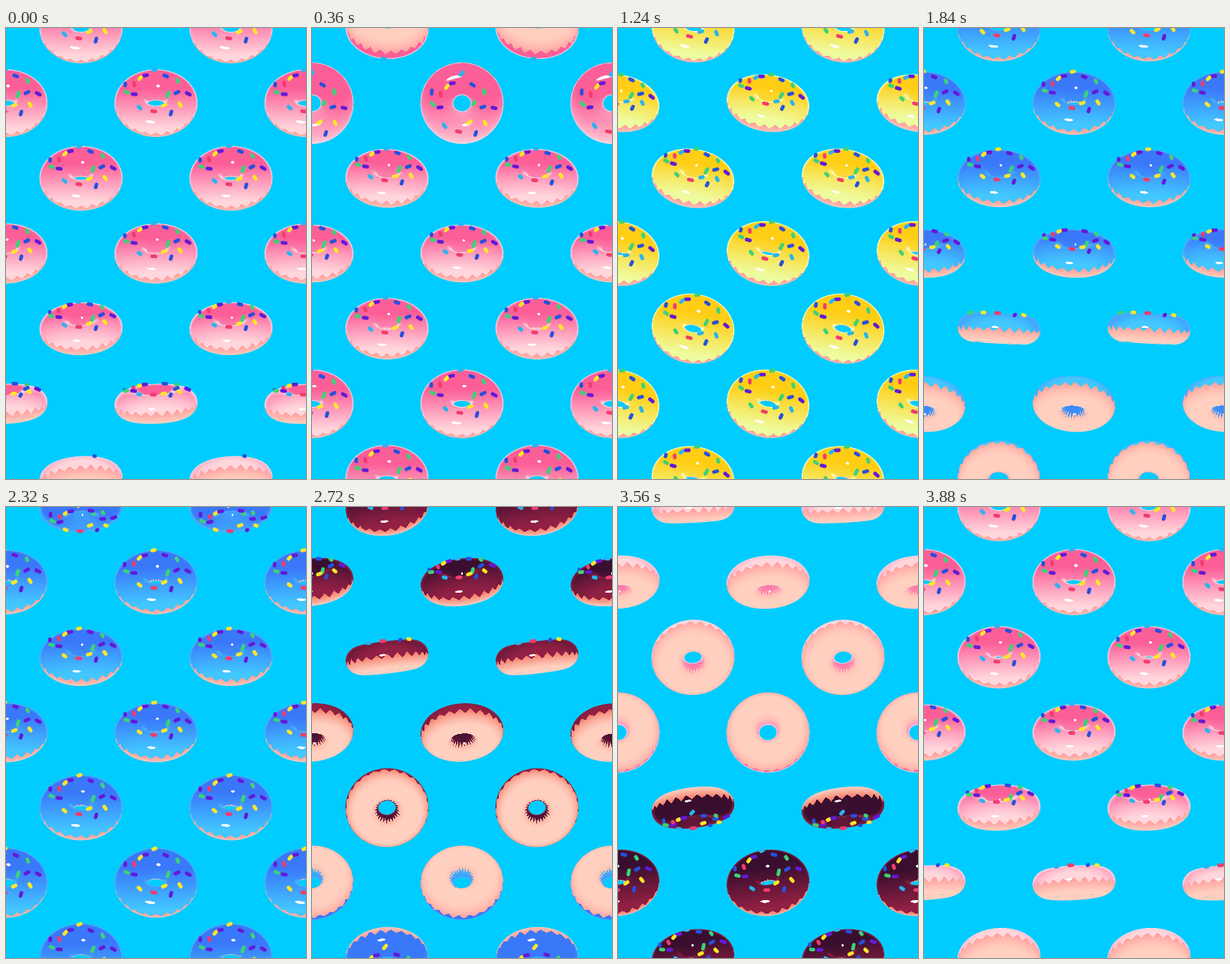
An HTML page with a canvas for the animation above (3920 ms loop, 400 by 600 pixels).

```html
<!DOCTYPE html>
<html>
<head>
<meta charset="utf-8">
<title>Flipping donuts</title>
<style>
html, body { margin: 0; width: 100%; height: 100%; overflow: hidden; background: #00ccff; }
canvas { display: block; }
</style>
</head>
<body>
<canvas id="stage" width="400" height="600"></canvas>
<script>
const LOOP = 3920, TURN = LOOP / 4, STEP = 40, ROW_DELAY = 68;
const RING = 33.5, TUBE = 21.5, FLAT = 19 / TUBE, SIZE = 120, HALF = SIZE / 2, TEETH = 24;

const stage = document.getElementById('stage').getContext('2d');
const sprite = document.createElement('canvas');
sprite.width = sprite.height = SIZE;
const pen = sprite.getContext('2d', { willReadFrequently: true });
const image = pen.createImageData(SIZE, SIZE);
const depth = new Float32Array(SIZE * SIZE);

const RED = '#f03c6e', YELLOW = '#ffe628', GREEN = '#3cd278',
      CYAN = '#28b4f0', BLUE = '#2850dc', PURPLE = '#6419d7';

// Icing goes from deep at the back to pale at the front; swap recolours sprinkles.
const DONUTS = [
  { deep: [252, 94, 152], pale: [255, 214, 220], rim: [255, 214, 226], crust: [255, 156, 156], swap: {} },
  { deep: [255, 206, 20], pale: [238, 252, 160], rim: [255, 253, 200], crust: [255, 156, 152], swap: { [YELLOW]: CYAN, [CYAN]: GREEN } },
  { deep: [58, 120, 250], pale: [66, 200, 255], rim: [80, 175, 255], crust: [255, 160, 154], swap: { [CYAN]: YELLOW, [BLUE]: PURPLE } },
  { deep: [58, 14, 46], pale: [146, 32, 68], rim: [140, 30, 66], crust: [244, 122, 104], swap: {} }
];
const CRUMB = [255, 208, 192], WHITE = [255, 255, 255];

// x, z on the top face, colour
const SPRINKLES = [
  [-22, 27, CYAN], [-3, 34, RED], [11, 21, YELLOW], [20, 36, BLUE],
  [32, 21, YELLOW], [43, 0, PURPLE], [28, -1, BLUE], [16, -4, GREEN],
  [29, -22, GREEN], [13, -31, BLUE], [-14, -32, PURPLE], [-21, -27, YELLOW],
  [-29, -16, RED], [-39, -2, GREEN], [-29, 2, PURPLE], [-2, -45, CYAN], [-41, -18, BLUE]
];

// One flip: rows elapsed, tilt in degrees
const FLIP = [
  [0, -40.5], [.4, -39], [1.2, -49], [2.2, -56], [3.2, -58], [3.8, -55], [4.15, -45],
  [4.4, -20], [4.9, 50], [5.36, 107], [5.9, 147], [6.36, 177], [6.9, 202], [7.4, 222],
  [8, 239], [8.4, 251], [9, 269], [9.4, 282], [10, 292], [10.4, 297], [11, 303],
  [12, 310], [13, 315], [14.41, 319.5]
];
const LEAD = [24, 24, -18, 0];
const ROLLS = [0, 10, 0, -10];

const clamp = v => Math.max(0, Math.min(1, v));
const smooth = v => v * v * (3 - 2 * v);
const mix = (a, b, k) => a.map((v, i) => v + (b[i] - v) * k);
const light = [-.1, .07, 1].map(v => v / Math.hypot(.1, .07, 1));

function tiltAt(s) {
  const i = FLIP.findIndex(p => p[0] >= s);
  if (i === 0) return FLIP[0][1];
  if (i < 0) return FLIP[FLIP.length - 1][1];
  const [s0, a0] = FLIP[i - 1], [s1, a1] = FLIP[i];
  return a0 + (a1 - a0) * (s - s0) / (s1 - s0);
}

function poseAt(time) {
  const u = ((time % LOOP) + LOOP) % LOOP;
  const turn = Math.floor(u / TURN), next = (turn + 1) % 4;
  const elapsed = u - turn * TURN + LEAD[turn];
  const tilt = tiltAt(elapsed / ROW_DELAY);
  const roll = ROLLS[turn] + (ROLLS[next] - ROLLS[turn]) * smooth(clamp(elapsed / TURN));
  return {
    tilt: tilt * Math.PI / 180,
    roll: roll * Math.PI / 180,
    donut: DONUTS[tilt > 160 ? next : turn]
  };
}

function icingEdge(x, z) {
  const a = (Math.atan2(x, z) / (2 * Math.PI) + .5) * TEETH;
  const saw = Math.abs((a % 1) * 2 - 1) * 2 - 1;
  const base = Math.hypot(x, z) < RING ? -9 : -2;
  return base + saw * (3.2 + .7 * Math.sin(a * 1.05));
}

function shade(donut, x, y, z, sin, cos) {
  const rho = Math.hypot(x, z) || 1e-6, out = rho - RING, rise = y / FLAT ** 2;
  const len = Math.hypot(out, rise) || 1;
  const nx = out * x / rho / len, ny = rise / len, nz = out * z / rho / len;
  if (y < icingEdge(x, z)) return mix(donut.crust, CRUMB, clamp(-ny * 1.1));
  const up = -ny * sin - nz * cos, toward = ny * cos - nz * sin;
  const color = mix(donut.deep, donut.pale, clamp((z - y + 28) / 74));
  const rim = mix(color, donut.rim, clamp((.38 - toward) / .25));
  const gloss = nx * light[0] + up * light[1] + toward * light[2];
  return mix(rim, WHITE, clamp((gloss - .9955) / .0015));
}

function drawBody({ tilt, roll, donut }) {
  const sin = Math.sin(tilt), cos = Math.cos(tilt);
  const cr = Math.cos(roll), sr = Math.sin(roll);
  const reach = RING * Math.abs(cos) + TUBE + 1.5;
  const data = image.data;
  data.fill(0);
  depth.fill(-999);
  for (let py = 0; py < SIZE; py++) for (let px = 0; px < SIZE; px++) {
    const dx = px + .5 - HALF, dy = py + .5 - HALF;
    const x = dx * cr + dy * sr, Y = dx * sr - dy * cr;
    if (Math.abs(x) > 56.5 || Math.abs(Y) > reach) continue;
    let Z = 57, nearest = 9, nearZ = 0, hit = false;
    for (let n = 0; n < 60 && Z > -57; n++) {
      const y = -Y * sin + Z * cos, z = -Y * cos - Z * sin;
      const d = (Math.hypot(Math.hypot(x, z) - RING, y / FLAT) - TUBE) * FLAT;
      if (d < nearest) { nearest = d; nearZ = Z; }
      if (d < .06) { hit = true; break; }
      Z -= Math.max(d, .08);
    }
    const alpha = hit ? 1 : clamp(.8 - nearest);
    if (!alpha) continue;
    const i = py * SIZE + px;
    const color = shade(donut, x, -Y * sin + nearZ * cos, -Y * cos - nearZ * sin, sin, cos);
    depth[i] = nearZ;
    data[i * 4] = color[0];
    data[i * 4 + 1] = color[1];
    data[i * 4 + 2] = color[2];
    data[i * 4 + 3] = alpha * 255;
  }
  pen.putImageData(image, 0, 0);
}

function drawSprinkles({ tilt, roll, donut }) {
  const sin = Math.sin(tilt), cos = Math.cos(tilt);
  const cr = Math.cos(roll), sr = Math.sin(roll);
  const height = (x, z) => FLAT * Math.sqrt(Math.max(0, TUBE ** 2 - (Math.hypot(x, z) - RING) ** 2));
  const project = (x, z) => {
    const y = height(x, z) + 1, v = y * sin + z * cos;
    return [HALF + x * cr - v * sr, HALF + x * sr + v * cr, y * cos - z * sin];
  };
  pen.lineCap = 'round';
  pen.lineWidth = 4.8;
  SPRINKLES
    .map(([x, z, color], i) => ({ x, z, color, angle: i * 2.4 + .9, at: project(x, z) }))
    .sort((a, b) => a.at[2] - b.at[2])
    .forEach(({ x, z, color, angle, at }) => {
      const rho = Math.hypot(x, z);
      const toward = (height(x, z) * cos - (rho - RING) * z / rho * sin) / TUBE;
      const behind = depth[Math.floor(at[1]) * SIZE + Math.floor(at[0])];
      if (toward < -.25 || at[2] < behind - 2) return;
      const ex = 2.3 * Math.cos(angle), ez = 2.3 * Math.sin(angle);
      const a = project(x - ex, z - ez), b = project(x + ex, z + ez);
      pen.strokeStyle = donut.swap[color] || color;
      pen.beginPath();
      pen.moveTo(a[0], a[1]);
      pen.lineTo(b[0], b[1]);
      pen.stroke();
    });
}

function render(time) {
  stage.fillStyle = '#00ccff';
  stage.fillRect(0, 0, 400, 600);
  for (let row = 0; row < 7; row++) {
    const pose = poseAt(time - row * ROW_DELAY);
    drawBody(pose);
    drawSprinkles(pose);
    for (let x = row % 2 ? 0 : 100; x <= 400; x += 200) {
      stage.drawImage(sprite, x - HALF, row * 100 - HALF);
    }
  }
}

const start = performance.now();
let shown = -1;
function tick() {
  const time = Math.floor(((performance.now() - start) % LOOP) / STEP) * STEP;
  if (time !== shown) render(shown = time);
  requestAnimationFrame(tick);
}
tick();
</script>
</body>
</html>
```
